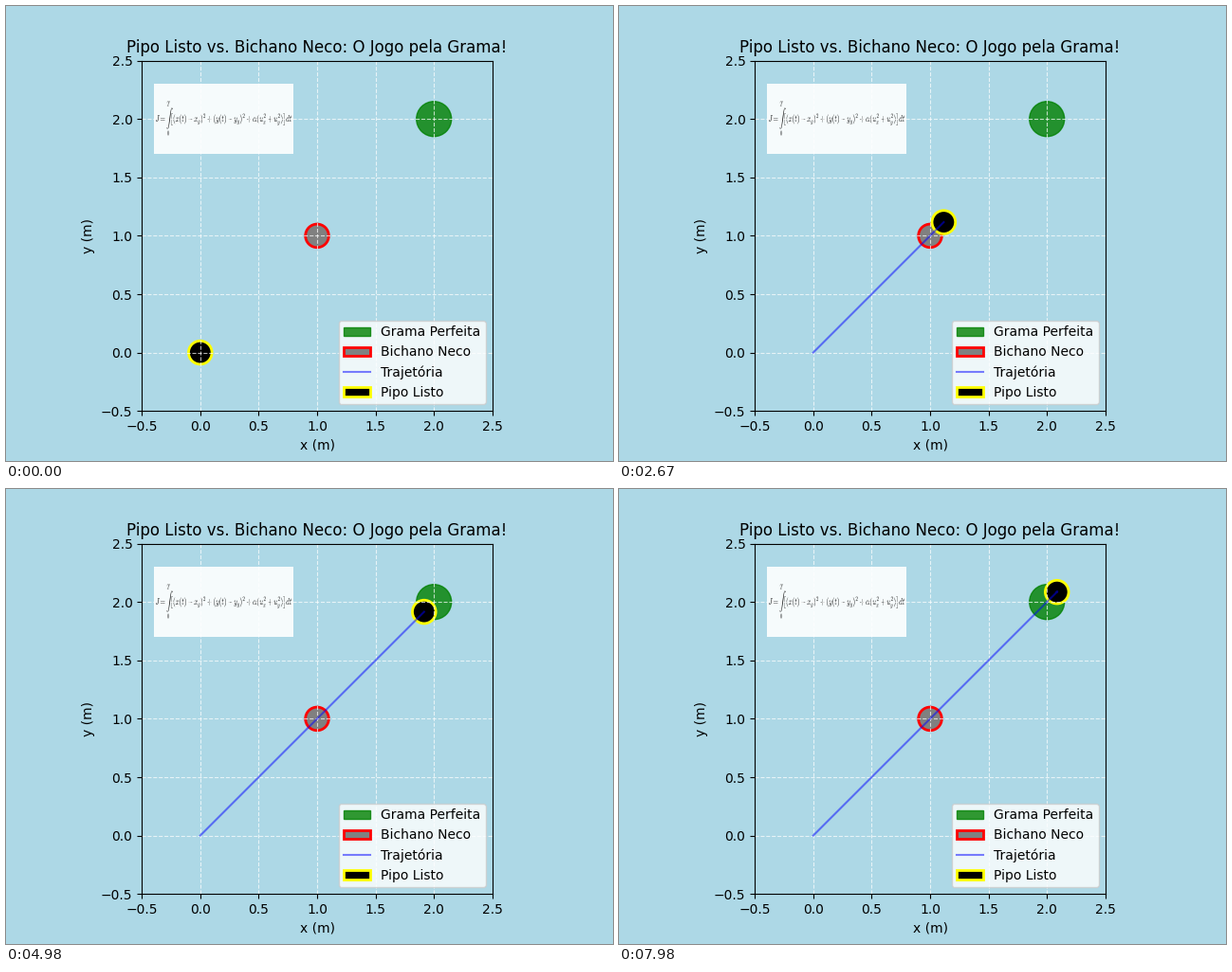
These frames come from a looping animation (640 by 480 pixels, 8 s). A matplotlib script:

```python
import numpy as np
import matplotlib.pyplot as plt
from matplotlib.animation import FuncAnimation
from matplotlib.patches import Circle, PathPatch, Rectangle
from matplotlib.textpath import TextPath
from matplotlib.transforms import Affine2D

plt.rcParams["font.family"] = "DejaVu Sans"
plt.rcParams["mathtext.fontset"] = "cm"

HERO, RIVAL = "Pipo Listo", "Bichano Neco"
GOAL = 2.0
ALPHA = 0.1                 # control weight in the cost
DT = 0.01
STEP_MS = 30                # time on screen of one simulation step
INTERVAL, FRAMES = 25, 320


def simulate(steps):
    """Double integrator under LQR control, explicit Euler; x equals y."""
    kp = 1 / np.sqrt(ALPHA)
    kd = np.sqrt(2 * kp)
    pos, vel = 0.0, 0.0
    path = [pos]
    for _ in range(steps):
        force = kp * (GOAL - pos) - kd * vel
        pos += vel * DT
        vel += force * DT
        path.append(pos)
    return np.array(path)


def add_formula(ax):
    """Cost functional, fitted into a white panel like a squeezed image."""
    ax.add_patch(Rectangle((-0.4, 1.7), 1.2, 0.6, fc="white", lw=0,
                           alpha=0.9, zorder=0.2))
    tex = (r"$J = \underset{0}{\overset{T}{\int}}"
           r"\left[(x(t) - x_g)^2 + (y(t) - y_g)^2"
           r" + \alpha(u_x^2 + u_y^2)\right] dt$")
    glyphs = TextPath((0, 0), tex, size=20)
    box = glyphs.get_extents()
    left, right, bottom, top = -0.38, 0.781, 1.86, 2.15
    fit = (Affine2D().translate(-box.x0, -box.y0)
           .scale((right - left) / box.width, (top - bottom) / box.height)
           .translate(left, bottom))
    ax.add_patch(PathPatch(glyphs, fc="black", lw=0, alpha=0.9, zorder=0.3,
                           transform=fit + ax.transData))


track = simulate(FRAMES * INTERVAL // STEP_MS + 1)

fig, ax = plt.subplots(figsize=(6.4, 4.8), dpi=100, facecolor="lightblue")
ax.set_facecolor("lightblue")

add_formula(ax)
ax.add_patch(Circle((GOAL, GOAL), 0.15, color="green", alpha=0.8,
                    label="Grama Perfeita"))
ax.add_patch(Circle((1, 1), 0.1, fc="gray", ec="red", lw=2, label=RIVAL))
trail, = ax.plot([], [], color="blue", lw=1.5, alpha=0.5, label="Trajetória")
hero = ax.add_patch(Circle((0, 0), 0.1, fc="black", ec="yellow", lw=2,
                           label=HERO))

ax.set_aspect("equal")
ax.set_xlim(-0.5, 2.5)
ax.set_ylim(-0.5, 2.5)
ax.set_xticks(np.arange(-0.5, 2.6, 0.5))
ax.set_yticks(np.arange(-0.5, 2.6, 0.5))
ax.grid(True, color="white", linestyle="--", alpha=0.7)
ax.set_xlabel("x (m)")
ax.set_ylabel("y (m)")
ax.set_title(f"{HERO} vs. {RIVAL}: O Jogo pela Grama!")
ax.legend(loc="lower right")


def update(i):
    k = (i * INTERVAL + INTERVAL // 2) // STEP_MS
    trail.set_data(track[:k + 1], track[:k + 1])
    hero.center = (track[k], track[k])
    return trail, hero


anim = FuncAnimation(fig, update, frames=FRAMES, interval=INTERVAL,
                     repeat=True, repeat_delay=0)
plt.show()
```
